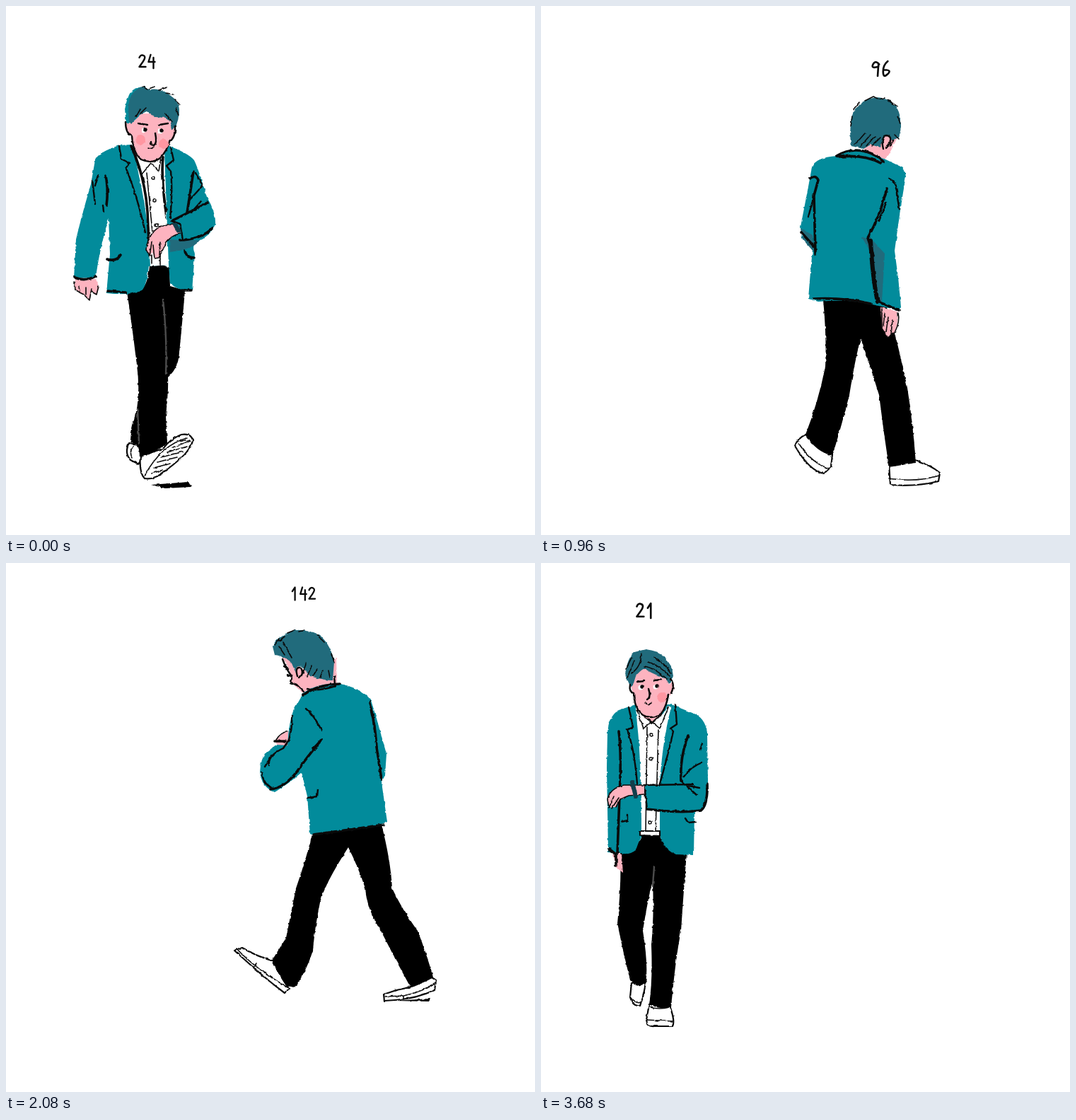
These frames come from a looping animation (748x748 px, 3.84 s). An HTML page:

```html
<!DOCTYPE html>
<html lang="en">
<head>
<meta charset="utf-8">
<title>Walking in a circle</title>
<style>
html, body { margin: 0; width: 100%; height: 100%; overflow: hidden; background: #fff; }
svg { display: block; width: 100vw; height: 100vh; }
path { fill: none; stroke: #0a0a0a; stroke-width: 2.4; stroke-linecap: round; stroke-linejoin: round; }
.t { fill: #028b9b; stroke: none; }
.d { fill: #216b7c; stroke: none; }
.p { fill: #fdb3bf; stroke: none; }
.k { fill: #000; stroke: none; }
.f { fill: #fff; stroke: none; }
.w { fill: #fff; stroke-width: 2.2; }
.x { stroke-width: 1.6; }
.o { stroke-width: 1.4; }
.m { stroke-width: 3.6; }
.h { stroke-width: 6; }
.g { stroke: #4d4d4d; }
.s { stroke: #123f4c; stroke-width: 6; }
.b { stroke: #ff96a1; stroke-width: 14; }
.v { stroke: #fff; stroke-width: 7; }
.e { stroke-width: 5.5; }
.pose, .num { visibility: hidden; animation: pose 3840ms step-end infinite; }
.num { animation-name: num; }
@keyframes pose { 0% { visibility: visible } 8.33333%, 100% { visibility: hidden } }
@keyframes num { 0% { visibility: visible } 4.166667%, 100% { visibility: hidden } }
</style>
</head>
<body>
<svg id="stage" viewBox="0 0 748 748" role="img" aria-label="A man walks in a circle under a changing number"></svg>
<script>
// One drawing step per line: a style letter, then a path or a list of dots.
const art = {
  headFront: `
p M169 168L178 152L230 152L236 168Q240 164 239 174Q238 186 231 192Q228 206 219 215Q206 224 192 217Q180 206 178 186Q170 182 169 168Z
t M170 166L168 146Q172 128 176 122Q184 113 196 115L188 156L177 166Z
d M174 164L173 145Q174 128 180 122Q188 114 196 114L204 118Q214 116 225 122Q238 128 244 140Q247 152 241 168L235 175Q234 162 226 158L210 157L199 149Q188 154 184 158L177 167Z
x M202 117l8-3M216 119l12-4M226 123l10 2M238 132l7 7M240 144l4 10M200 118l-6-4M184 156l6-10M190 152l8-8M226 152l8 12
l M169 164Q169 180 178 184Q180 208 191 217Q206 224 218 215Q228 204 231 192Q240 186 239 170
l M187 166L200 168M216 168L229 166
l M211 180Q214 194 209 197Q205 197 205 192
x M201 201q5 2 8-2
b 190 189 223 195
v 195 176 218 177
e 197 175 220 176`,
  bodyFront: `
t M177 196L160 197Q130 207 126 218L120 252Q106 300 99 330L96 385L127 384Q131 350 145 300L147 350L142 406Q175 410 192 402Q198 398 202 368L230 366L232 392Q245 404 263 403L267 350Q262 338 270 333Q290 325 296 308Q297 292 284 270Q272 230 266 218Q258 208 226 196L206 218Z
f M180 198L192 216L217 216L224 206L230 366L204 368Q202 300 188 240Z
d M231 330Q254 332 274 331Q266 344 232 348Z
x M181 206Q183 222 192 238L205 222L216 234L219 214M199 236L208 330M220 240L226 300M206 352v12M218 346v20
o 208 243 210 275 213 310
l M160 198L163 216L174 222L170 230Q186 270 197 320M233 200L237 218L227 226L233 234Q236 262 232 300
m M177 198Q196 240 200 290L202 335M222 214Q219 240 226 290M141 240Q145 260 142 282M285 278Q262 290 234 304M265 234Q260 268 256 292M246 331Q276 330 292 314
l M122 246L126 280M130 240l-4 14M262 292L276 276M258 276L278 254L268 236M137 282l1 8
m M143 358Q156 362 162 352M253 346Q254 356 266 356M143 403L170 405M248 402h14
p M198 344Q202 318 220 310L238 308L246 322Q234 324 227 334L216 356L210 357L207 348L203 354Z
x M198 344Q202 318 222 310L236 308M246 322Q234 324 227 334L216 356L210 357L208 338M203 354L206 334M217 352L218 334M198 344L203 354
s M238 307L244 318
l M234 304L246 308L250 330
p M98 386L127 386L132 398L128 408L121 404L118 416L110 408L98 402Z
x M97 390L98 402L110 408L118 416L121 400M104 404l-1-8M113 408l0-10M121 404L128 408L131 396
m M97 384Q112 390 127 382`,
  legs0: `
w M174 618Q167 632 176 642L188 648L192 638L187 620Z
w M190 636Q188 660 196 668Q210 671 228 655Q262 630 264 614Q262 604 248 606Q232 612 222 626Z
x M196 664Q220 620 256 611M206 661L222 656M209 653L232 647M214 645L242 638M220 638L250 630M228 631L256 623M236 624L260 615M240 617l14-3M180 622q-6 8-2 16
k M171 404Q178 450 184 500Q190 540 185 570Q176 600 176 616L188 622L189 638Q205 636 228 618L226 580Q230 540 229 525Q244 512 245 490Q250 440 253 402L232 396L231 370Q216 362 203 368Q200 396 190 402Z
g M222 415Q228 470 226 520M186 570L188 618
k M205 677L258 673L262 680L225 682Z`,
  legs1: `
w M180 606Q164 616 153 640Q158 664 170 686L180 688Q188 660 198 636Z
x M160 632Q166 660 178 686
w M388 646Q404 636 416 624Q432 618 442 610L444 622Q434 652 398 672L390 666Z
x M396 668Q424 648 440 616
k M254 412Q254 460 244 500Q226 550 176 608L198 638Q250 590 282 540Q292 510 300 480Q320 520 346 560Q360 600 388 648L418 626Q396 570 374 530Q350 480 338 410L316 400L314 380L289 380L284 410Z`,
  headSide: `
p M360 196L364 184L372 164L400 168L438 176Q438 184 430 190Q420 198 418 208L419 222L404 219L403 224L397 230Q390 232 382 224L362 206Z
d M363 188Q360 168 372 148Q388 132 406 132Q436 138 446 152Q448 170 438 180Q430 175 420 173Q404 170 386 176Q386 166 378 167Q371 170 371 186Z
l M438 180Q434 188 426 194Q417 202 417 222L402 218M404 214l3-3M402 220L404 224L396 230Q388 230 382 224
m M413 181L418 183
l M403 193q5 5 9 1M411 188l-1 8M372 186Q368 168 378 167Q386 166 386 176
x M384 178Q394 158 420 160M388 174Q410 158 440 162M394 172L408 164M410 170l12-6M424 170l10-6M430 142l8-4M438 147l9-5M442 153l8-6M445 160l4 4M443 168l6 4
b 386 204`,
  body2: `
d M390 302Q404 300 422 304L413 318L412 344L390 346Z
p M420 314Q436 308 448 316L470 336Q474 342 468 344L466 356L460 358L452 350L450 360Q444 360 442 346L437 342L435 352L429 346L428 330Q418 330 420 314Z
x M434 310Q452 316 470 336Q473 342 466 342L466 356Q460 358 452 338M460 356L454 352L450 360Q444 358 442 336M442 346L437 342L435 352L427 340M455 325l12 8
h M415 322L418 342
w M413 316L424 306L430 310L420 316Z
p M411 412L430 402Q442 420 444 440L440 448L434 446L424 444L420 438L416 440Z
x M412 412L416 440L420 434L424 444L428 436L434 446L434 434L440 448Q446 440 438 414M424 414l4 18M430 412l6 18
f M344 198L358 198L384 228L386 252Z
t M342 200Q316 210 311 226Q306 262 304 300Q304 350 295 416Q340 418 362 416L396 424L432 404Q424 380 396 346L392 330L390 262Q384 244 378 236Q362 214 346 200Z
d M316 252Q326 320 342 358L356 374Q358 404 370 416L390 416L356 364Q332 300 316 252Z
m M316 252Q332 300 346 344Q362 382 398 424L404 424L433 403M386 344Q406 372 432 402M296 416Q330 414 350 418
l M312 232Q326 212 354 224M318 252Q328 276 352 284M330 268L354 292M370 262Q372 300 392 346M364 346q14-2 16-6M368 350l10 0M386 336l14-32L428 306
l M346 202Q372 224 376 236Q384 260 390 300M360 222L368 246L376 240M368 246Q382 270 380 290M392 292v52
x M358 200L374 220L384 232L384 246M350 200L366 220
m M314 370Q330 376 356 374`,
  legs2: `
w M213 600Q220 594 230 596L248 622L254 650Q268 672 266 682L262 684Q240 664 232 645Q220 625 213 600Z
x M222 598Q226 640 264 680
w M390 662L412 660L432 654Q470 656 488 658L489 666Q470 676 440 678L390 674Z
x M390 672Q420 664 444 668L488 664M446 668v8
k M309 414Q312 450 304 490Q300 512 288 526Q260 552 226 582Q232 602 252 621L268 610Q300 582 330 550Q346 520 358 482Q362 474 366 494Q382 520 386 560Q384 610 388 662Q410 666 430 654Q426 620 428 580Q428 540 414 500Q410 460 396 424L374 414Z
g M364 448Q360 465 358 478`,
  headBack: `
p M534 190L560 188Q564 174 574 176L586 180L574 204L568 211L546 206Z
d M521 192Q518 178 520 162Q520 142 536 130Q552 121 564 124Q582 128 588 144Q594 160 588 180L578 184Q574 174 566 180L562 194L548 190L538 196Z
l M566 196Q562 180 570 177Q580 178 574 190L570 194M576 192L580 184
x M540 128L552 122L560 126L568 124M572 127L586 136M522 150l-2 14M526 190l14-16M534 192l14-16M542 192l12-14M550 192l12-12M524 140l8-10M586 150l4 10M582 176l6 6`,
  body4: `
t M500 206Q470 208 465 222Q460 250 456 270L449 306L451 322L466 338Q462 380 460 408L474 412Q520 408 550 416L588 424L591 420Q588 380 582 340Q590 280 598 234Q596 222 584 218Q560 206 540 199L520 197Z
d M449 308L466 318L468 342L452 324ZM535 320L548 322L568 344Q566 380 564 412L556 412Q550 370 550 345Z
h M548 326Q551 380 558 412
m M500 206Q520 194 542 200Q556 204 566 214M504 207Q540 204 562 216M462 238Q470 232 474 240L468 262L470 345M571 252Q562 290 544 322L552 346M450 314L468 334M468 408Q510 406 548 415M558 412L588 424
l M585 260l4 22M574 238q14 6 12 28M466 270l-6 22M570 272l-10 26
p M562 420L586 426Q588 440 582 456L572 462L564 450Z
x M564 422L564 450L572 462L582 456Q590 440 587 428M570 454l3-20M577 458l2-20M566 446l2-18`,
  legs4: `
w M430 622Q438 614 448 620L484 634Q510 634 519 646L518 652Q490 664 478 664Q450 656 430 630Z
x M436 620Q460 654 476 655Q500 650 518 652M444 620Q460 642 474 648L516 645M432 632Q460 664 480 662
w M599 636L620 622Q618 606 640 585L647 596Q640 620 626 636Q614 650 608 648Z
x M606 644Q632 630 642 592
k M481 410Q484 450 476 490Q462 540 456 570L438 614Q460 630 484 632Q498 600 500 580Q508 530 518 485Q526 456 530 446Q540 470 556 490Q576 520 580 545Q582 590 598 636Q612 640 622 624Q618 580 614 530Q606 490 586 456L568 462L562 412L520 406Z`,
  legs3: `
w M374 606Q362 612 359 622Q380 658 400 661L410 652L412 634Z
x M364 618Q384 648 408 654
w M492 648L530 642Q552 650 564 660L562 672Q530 680 494 677Z
x M492 668Q530 674 563 664
k M399 416Q404 470 402 510Q392 560 374 606Q388 630 412 636Q426 590 436 550Q444 500 452 470Q466 510 478 550Q484 600 492 652L530 646Q526 590 518 540Q506 480 488 420L440 412Z`,
  headBackLeft: `
p M386 128Q398 142 404 160L402 168L420 184L468 172L467 134L420 150Z
d M380 130L377 118Q382 106 390 104Q402 93 420 95Q440 98 446 104Q460 118 464 140L462 166Q450 166 430 160L418 146Q408 144 410 156L404 142Q396 132 380 130Z
l M391 136Q396 150 404 160L402 169L411 172L421 182M393 146l6 4M412 160Q408 146 417 148Q422 158 414 162M398 158l5 2M464 160l1 12
x M380 116L386 107M386 110l8-6M398 99l10-4M414 97l8-2M392 112l12 22M386 118l8 12M424 142l-4 14M432 146l-6 14M440 150l-6 10M448 152l-4 10M456 152l2 10M440 102l10 10M460 128l4 12`,
  body6: `
p M380 252L390 242L400 238L402 256L386 260Z
t M420 184Q440 170 470 170Q505 178 516 194L524 220L538 270L536 300L531 310L539 366L528 370Q480 376 430 384L426 330L418 296Q400 312 380 324Q362 318 359 296Q360 276 368 268L382 257L398 258Q400 222 408 205Z
x M382 250Q388 240 398 238M386 250L394 254
m M380 252L395 252M420 187Q440 172 472 171M446 250Q426 274 412 294Q394 318 374 320M516 206Q522 230 524 260L531 306M434 384Q480 378 534 370
l M426 178Q440 182 466 174M424 206Q436 216 446 236M404 216Q405 234 400 250L392 262Q370 272 372 286M361 296q4 18 16 23M366 288L376 272M446 250L434 262M514 196l6 26
l M427 332L440 330L441 320`,
  legs6: `
w M323 548L334 544Q354 556 378 563L400 602L394 608Q370 590 350 572Z
x M326 545Q350 572 398 600M350 572l4-6
w M534 610L552 604Q578 600 602 586L608 590L606 604Q580 616 550 618L535 619Z
x M536 613L562 612Q590 606 606 594M562 612v5
k M434 380Q424 420 410 460Q402 500 396 530L376 562Q384 580 396 598L408 600Q424 580 434 548Q436 520 444 480Q450 455 484 402Q498 430 508 460Q510 490 530 520Q550 560 572 600L604 586Q594 550 582 520Q560 490 546 460Q544 420 530 366L480 372Z
k M548 619L600 616L598 620Z`,
  legs5: `
w M417 588Q424 574 454 566L492 596Q470 612 440 606Z
x M418 592Q444 606 484 600
w M556 604L596 606Q602 620 598 630L556 630Q550 620 556 604Z
x M555 624h44
k M512 380Q500 440 482 490Q466 530 452 566Q468 590 492 598Q510 560 520 520Q540 470 558 420Q564 470 562 510Q556 560 556 606L596 608Q602 550 604 500Q614 440 610 366Z`,
  body7: `
f M352 176L388 146L394 152L360 182Z
t M392 150Q424 164 430 190Q440 250 436 300L446 364Q400 372 352 364Q356 310 350 250Q346 200 362 172Z
p M328 252L306 250Q292 258 285 274L294 282L306 272L328 270Z
x M328 252L306 250Q292 258 285 274L294 282L306 272L326 270M290 276l10-12M297 279l10-12
s M320 252L322 270
m M329 252Q360 258 386 252Q384 220 392 196M328 282L382 297Q404 300 418 284Q430 250 424 206M329 252L328 282M356 366Q400 372 444 364
l M392 152Q366 170 362 186Q354 220 356 250M386 252Q398 246 404 236M390 262l14 2M398 334h26l4-4`,
  legs7: `
w M300 578Q316 578 332 564L366 588L364 606Q340 610 300 592Z
x M300 586Q334 602 365 600
w M434 544L464 532Q476 548 472 562Q464 586 444 592L436 584Z
x M440 590Q464 574 468 544
k M354 360Q352 420 344 470Q336 520 330 566L366 590Q376 540 384 500Q394 450 402 420Q412 460 418 490Q430 520 434 546L464 536Q456 500 450 460Q450 410 444 360Z`,
  headLeft: `
p M244 120Q260 106 280 108Q292 112 294 126Q304 116 304 130Q304 142 299 144L305 153Q300 166 296 172Q288 182 276 174Q260 162 254 148Q244 138 244 120Z
d M238 124L235 106L244 101L250 90Q262 82 272 84Q296 90 304 104Q309 126 306 148L301 142Q305 118 295 126L292 122Q282 113 268 112Q254 111 244 121Z
l M244 122Q246 140 256 150Q266 166 276 170Q290 170 292 162M296 126Q304 118 304 132L300 142M298 144L297 128M306 140v12
l M248 132L256 130M265 125L274 126
l M262 136Q271 146 270 149L264 151
x M267 155l6-2M240 122l-3-12M246 116l-2-12M252 110q2-12 14-16M262 108q10-12 26-8M274 110q10-8 22-2M284 112l14 4M288 118l14 8M258 88l10 8M274 88l16 12
b 284 143
v 255 137 274 134
e 254 137 275 134`,
  body8: `
p M248 328L258 334L256 362L246 358L240 346Z
x M248 330L240 346L246 360L249 344M252 362L253 346M256 358l1-14
t M272 172L252 188Q246 200 249 220L256 258L262 300Q248 318 246 328L257 338L257 362Q270 360 275 352L279 332L313 330Q322 350 345 356L366 357L356 308L356 250Q368 215 366 198Q360 186 345 176L308 154Z
f M276 172L306 154Q304 180 301 210Q302 260 312 332L280 332Q280 250 274 200Z
p M284 174L300 158L300 170L288 180Z
x M276 174L278 188L288 180L297 188L306 154M288 184Q286 260 288 330M299 190L298 260M300 298L306 330
o 292 195 292 222 292 250 292 313
w M276 333L314 331L316 338L276 339Z
t M245 256Q300 260 326 260L352 250Q346 292 330 298Q290 296 247 290Z
m M246 256Q280 260 324 259M246 290Q300 296 332 298Q346 290 355 250M277 298Q270 330 275 348M245 256v33
l M306 272Q316 266 324 254M310 262L318 270M350 215Q330 224 318 240L312 262M330 192Q318 216 314 252M340 240L322 256M356 250V274
l M274 172L276 190L266 194L270 200Q274 230 278 256M316 162L320 184L306 188L314 198Q300 230 301 256M254 210Q260 240 261 256
l M326 304Q328 312 336 314L358 310M262 312q6 4 9-4
o 254 285
p M246 254L222 253Q208 260 200 270L198 280L206 284L212 286L218 282L226 274L246 270Z
x M246 254L222 253Q208 260 199 274L200 280L212 266M205 284L216 270M210 287L222 272M214 284L228 273L246 270
s M235 253Q242 260 239 270`,
  legs8: `
w M188 548Q194 544 200 546L232 558L258 582L256 598Q246 602 238 596Q210 580 190 556Z
x M190 552Q214 562 226 578Q240 592 256 590
w M362 584Q376 576 390 552L424 534L432 542Q420 566 396 590L364 590Z
x M364 584L394 582Q414 562 430 542M388 566l8 4M394 582l2 8
k M262 360Q254 400 252 430Q244 470 240 500L231 560Q240 575 262 584Q272 560 276 520Q278 480 288 456Q290 430 300 392L306 390Q320 420 334 456Q360 490 372 510Q378 540 390 552Q408 554 424 534Q416 510 404 494Q386 460 372 430Q362 390 360 354L320 338L276 336Z
m M217 597L250 600`,
  headNear: `
p M156 156L158 136L170 126L180 124L207 138L210 150Q218 144 217 156L210 166Q206 190 197 198Q184 206 173 197Q164 190 160 168Z
d M156 154L150 148Q152 126 158 118Q164 104 178 104Q196 106 202 114Q214 124 215 140L211 152L206 142Q192 138 180 128L168 133Q160 142 159 154Z
l M156 150Q164 188 172 196Q186 203 198 196Q208 184 209 166M213 146Q220 154 210 165M154 154q-2 8 5 12
l M168 150h9M190 150l9-1
l M183 160Q185 172 182 176L179 174
x M180 182h7M160 118l-8 16M164 122l-8 18M172 110q2 14-12 24M176 124q14 2 28 14M184 120q12 4 24 16M192 112q12 6 18 20
b 170 175 201 175
v 172 158 193 158
e 174 158 195 158`,
  body10: `
t M164 185L134 196Q122 204 121 220L119 374L140 376L142 392Q160 390 166 378L172 360L198 362Q206 380 225 388L245 387L244 330Q250 310 252 290Q258 250 259 220Q254 204 240 194L214 184Z
f M164 188L174 196L200 196L212 190Q198 230 196 270L196 362L172 362Q170 270 166 210Z
p M174 194L200 194L186 208Z
x M166 196L172 214L184 206L196 218L206 194M178 216Q180 280 178 360M194 220L192 362
l M176 198L186 207L200 196
o 187 227 186 258 187 288 184 345
w M170 357L198 357L198 364L170 363Z
p M120 375L138 378Q140 394 136 404L130 413L124 410L118 402Z
x M119 378L117 402L124 410L126 394M130 412L132 394M138 382Q140 394 136 404
t M155 294L222 294Q236 286 252 280Q248 312 232 330Q200 334 158 326Z
m M156 294Q190 298 224 298M158 327Q200 334 230 332Q246 318 252 282M155 294L158 327M144 310L141 376M220 264L211 290M234 340l3 5h9
l M258 240Q240 252 234 264M240 218Q224 236 220 264M206 290L222 299M214 288l12-2M136 214Q144 230 146 290M142 344l10-3l1-8
l M154 186L158 206L150 210Q164 240 168 292M220 184L221 206L212 210Q206 260 196 294
p M156 292L126 292Q106 302 101 316L108 328L114 318L126 310L156 308Z
x M156 292L126 292Q106 302 101 316L106 328L112 310M108 328L118 310M114 318L126 310L156 308
s M142 291L146 311`,
  legs10: `
w M172 594Q160 606 160 614Q164 622 184 620L180 600Z
x M161 612Q170 618 182 614
w M184 618L202 602Q216 594 224 582Q234 570 246 572Q252 580 244 598Q226 626 200 638Q186 642 184 618Z
x M190 634Q204 604 244 576M198 632L212 626M200 624L222 618M206 616L230 609M212 609L237 601M220 601L242 593M226 593L246 584M234 586l10-5
k M146 390Q150 440 148 500Q158 540 166 570L172 596Q182 600 182 622Q200 600 214 590Q212 560 218 510Q226 480 228 440L234 386Q204 384 198 364L174 362Q166 384 146 390Z
g M183 400Q188 450 183 520Q178 570 184 600
k M190 641L222 644L223 650L192 646Z`,
  legs9: `
w M142 582Q158 580 174 574L206 594Q204 608 194 614Q160 612 142 590Z
x M143 587Q170 606 200 605
w M304 556L336 542Q350 542 361 550Q352 580 316 590Q296 590 304 556Z
x M304 582Q340 578 357 550
k M177 378Q182 430 174 480Q170 530 172 580L206 594Q212 540 220 490Q224 450 230 424Q246 470 270 500Q290 530 306 560L336 544Q320 510 300 470Q278 420 265 374Q236 376 229 352L204 352Q196 374 177 378Z`,
  headEnd: `
p M127 174L132 152L146 145L178 160L181 172Q188 162 188 174Q188 184 180 188Q178 206 170 214Q156 226 144 216Q132 204 130 184Z
d M126 174L119 158Q122 134 132 126L148 122Q166 124 174 132Q186 144 187 160L181 171Q178 163 168 160Q156 156 146 149Q138 154 134 160L130 173Z
l M126 172Q124 182 131 184Q132 206 144 215Q156 222 170 213Q178 202 180 186M183 164Q190 172 184 184
l M136 168L146 167M160 166L170 165
l M152 178Q156 190 150 193
x M147 198q5 3 9 0M128 134l-8 16M132 138l-10 24M142 128q0 18-14 28M146 146q14 2 32 18M152 140q14 4 30 20M160 134q14 6 24 22
b 171 190
v 141 176 162 175
e 143 175 164 174`,
  body11: `
p M101 408L114 412L116 438L106 430Z
t M134 200L110 208Q96 216 94 240L93 290L95 408L112 410Q124 414 134 406L142 384L168 384Q172 404 190 412L216 413L217 352Q236 346 236 310L235 240Q232 218 214 212L184 200Z
f M134 204L144 214L172 214L180 202L184 204Q172 250 168 310L168 384L142 384Q142 280 136 228Z
p M146 214L172 214L157 226Z
x M136 208L145 234L156 224L168 234L180 204M150 232L148 384M166 236L162 380
l M146 216L157 226L170 214
o 156 243 156 277 154 367
w M140 379L168 379L168 386L140 385Z
t M146 314L216 312L236 320Q236 350 224 352L150 348Z
m M150 348Q196 354 226 350Q236 342 235 312M208 244Q196 276 198 308M110 238Q114 270 111 330L108 410M96 404L106 412L106 428
l M146 314L214 313M198 308L220 328M204 314L224 318M228 282Q212 288 202 302M146 314L150 348M228 256l-3 8
l M124 204L130 232L122 236Q132 262 136 312M190 200L192 228L183 234L187 238Q180 270 168 312
l M114 366L122 364L122 356M204 361L208 367L219 366
p M146 314L118 314Q98 318 94 334L96 346L106 345L112 334L124 329L146 327Z
x M146 314L118 314Q98 318 94 334L96 346L103 330M100 347L110 332M106 345L112 334L124 329L146 327
s M129 310L134 330`,
  legs11: `
w M128 594L126 614Q130 628 140 626Q146 610 148 592Z
x M127 614q8 10 14 7
w M153 624L149 646Q150 656 160 655L186 655Q190 648 182 626Z
x M149 646L187 648M154 628q14 4 28 0
k M112 410Q114 450 108 510Q116 550 126 590Q138 602 148 594Q152 570 144 520Q152 470 158 450Q160 500 156 540Q158 590 153 624Q168 632 184 628Q190 560 198 520Q202 460 206 410Q174 404 168 386L142 386Q134 408 112 410Z
g M160 430L158 456`
};

// Parts of each pose, back to front: [name, dx, dy, mirrored]
const poses = [
  [["legs0"], ["bodyFront"], ["headFront"]],
  [["legs1"], ["bodyFront", 85, 12], ["headLeft", 573, 56, 1]],
  [["legs2"], ["headSide"], ["body2"]],
  [["legs3"], ["headBack", -82, 6], ["body4", -82, 6]],
  [["legs4"], ["headBack"], ["body4"]],
  [["legs5"], ["headBackLeft", 95, 1], ["body6", 80, 1]],
  [["legs6"], ["headBackLeft"], ["body6"]],
  [["legs7"], ["headSide", 747, -49, 1], ["body7"]],
  [["legs8"], ["body8"], ["headLeft"]],
  [["legs9"], ["body10", 31, -10], ["headLeft", -62, 14]],
  [["legs10"], ["body10"], ["headNear"]],
  [["legs11"], ["body11"], ["headEnd"]]
];

// Centre and scale of the number over each pose
const spots = [
  [199, 78, 1], [279, 87, 1.1], [414, 92, 1.1], [481, 88, 1.1],
  [563, 82, 1], [523, 44, 1], [420, 43, .95], [349, 39, .95],
  [263, 41, .9], [212, 42, .95], [180, 53, .85], [147, 67, 1.1]
];
const counts = [24, 31, 46, 58, 73, 82, 96, 102, 107, 114, 121, 128,
  135, 142, 130, 118, 92, 75, 89, 104, 77, 52, 38, 21];

// Hand-lettered digits in a 10 by 20 box
const digits = [
  "M5 1Q0 3 1 11T5 19T9 9T5 1", "M2 7L6 1V20", "M1 5Q3 0 7 2T6 11L1 18H10",
  "M1 2H9L4 8Q10 9 9 14T1 18", "M4 1L1 11H10M8 5V20", "M9 1H2L1 8Q9 7 9 13T1 19",
  "M7 1Q1 6 1 14T5 19T9 14T2 12", "M0 2H9L4 20M2 10H9",
  "M8 3Q4-1 2 4T7 11T5 19T2 13T8 3", "M9 5Q4-1 1 5T8 8V5L7 20"
];
const advance = 13;

const stroke = line => {
  const style = line[0], data = line.slice(2);
  const dot = style === "o" ? "M$1 $2m-2 0a2 2 0 1 0 4 0a2 2 0 1 0-4 0" : "M$1 $2h.01";
  const d = data[0] === "M" ? data : data.replace(/(\d+) (\d+)/g, dot);
  return `<path class="${style}" d="${d}"/>`;
};
const part = ([name, dx = 0, dy = 0, mirrored]) =>
  `<g transform="matrix(${mirrored ? -1 : 1} 0 0 1 ${dx} ${dy})">` +
  art[name].trim().split("\n").map(stroke).join("") + "</g>";

const timed = (kind, i, step, body) =>
  `<g class="${kind}" style="animation-delay:${i * step - 3840}ms">${body}</g>`;

const number = (n, i) => {
  const [x, y, scale] = spots[i >> 1], chars = [...String(n)];
  const glyphs = chars.map((c, k) =>
    `<path transform="translate(${k * advance} 0)" d="${digits[c]}"/>`).join("");
  const left = (advance - 10 - chars.length * advance) / 2;
  return timed("num", i, 160, `<g aria-label="${n}" transform="translate(${x} ${y}) ` +
    `scale(${scale}) translate(${left} -10)">${glyphs}</g>`);
};

document.getElementById("stage").innerHTML = `
  <filter id="chalk" filterUnits="userSpaceOnUse" x="0" y="0" width="748" height="748" color-interpolation-filters="sRGB">
    <feTurbulence type="fractalNoise" baseFrequency=".16" numOctaves="2" seed="4"/>
    <feDisplacementMap in="SourceGraphic" scale="3" xChannelSelector="R" yChannelSelector="G"/>
  </filter>
  <g filter="url(#chalk)">${poses.map((p, i) => timed("pose", i, 320, p.map(part).join(""))).join("")}</g>
  ${counts.map(number).join("")}`;
</script>
</body>
</html>
```
